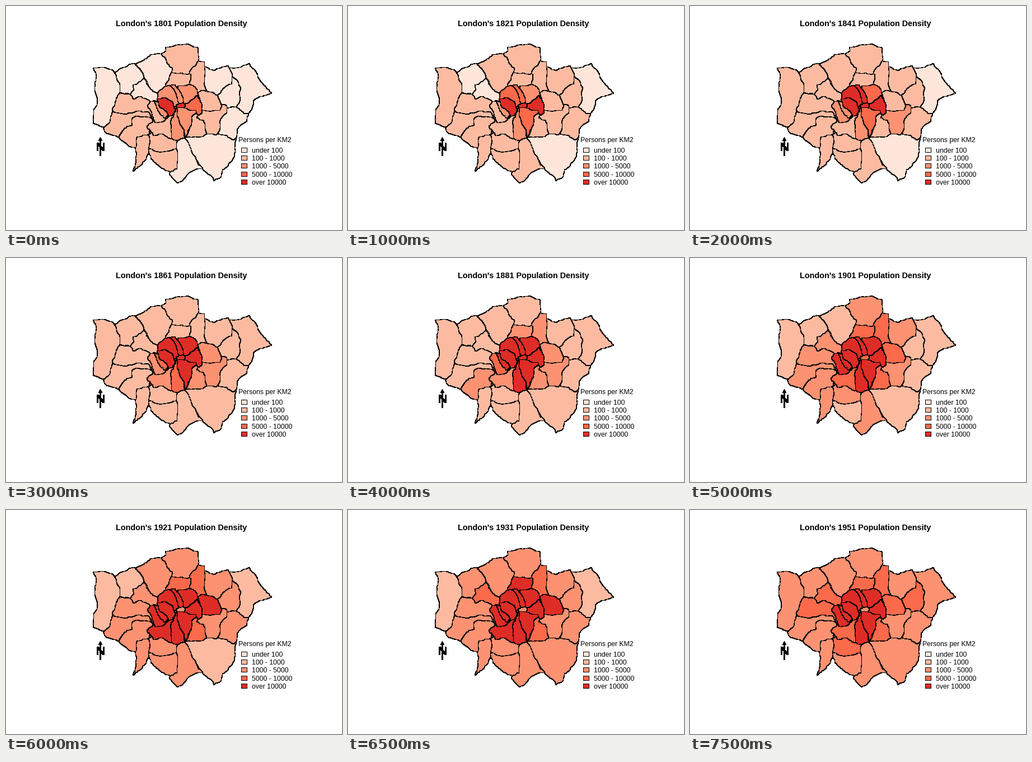
Write a matplotlib script that moves like this. It is 600 px wide and 400 px high and loops after 8 s.

```python
import numpy as np
import matplotlib.pyplot as plt
from matplotlib.animation import FuncAnimation
from matplotlib.patches import Polygon, Rectangle

W, H, DPI = 600, 400, 100
PX = 72 / DPI
REDS = ["#fee5d9", "#fcbba1", "#fc9272", "#fb6a4a", "#de2d26"]
LABELS = ["under 100", "100 - 1000", "1000 - 5000", "5000 - 10000", "over 10000"]
YEARS = [*range(1801, 1932, 10), 1939, 1951]

plt.rcParams["font.family"] = "Liberation Sans"
fig = plt.figure(figsize=(W / DPI, H / DPI), dpi=DPI, facecolor="white")
ax = fig.add_axes([0, 0, 1, 1])
ax.set(xlim=(0, W), ylim=(H, 0))
ax.axis("off")

rng = np.random.default_rng(7)
areas = []


def ragged(a, b):
    """Fractal border from a up to, not including, b."""
    d = b - a
    if np.hypot(*d) < 4:
        return [a]
    mid = (a + b) / 2 + np.array([-d[1], d[0]]) * rng.uniform(-0.11, 0.11)
    return ragged(a, mid) + ragged(mid, b)


def border(corners):
    pts = np.array(corners, float)
    line = [p for a, b in zip(pts, np.roll(pts, -1, axis=0)) for p in ragged(a, b)]
    return np.round(line) + 0.5


def area(level, steps, *corners):
    """Add a district; its class rises at each year in steps, falls at negative ones."""
    patch = Polygon(border(corners), ec="black", lw=PX, joinstyle="bevel",
                    antialiased=False, zorder=1 + len(areas) / 100)
    ax.add_patch(patch)
    areas.append((patch, level, steps))


def level_at(level, steps, year):
    return level + sum(1 if s > 0 else -1 for s in steps if abs(s) <= year)


# Later districts cover the rough inner sides of earlier ones.
# Hillingdon, Harrow, Havering, Enfield
area(0, [1821, 1939], (155, 110), (167, 109), (188, 113), (193, 118), (204, 140),
     (206, 165), (198, 195), (180, 216), (155, 209), (163, 172), (158, 148))
area(0, [1831, 1931], (193, 118), (212, 109), (228, 102), (252, 128), (246, 142),
     (228, 160), (203, 154), (203, 140))
area(0, [1861, 1939], (399, 110), (434, 102), (447, 119), (463, 143), (474, 156),
     (453, 161), (441, 170), (432, 192), (412, 186), (408, 165), (412, 150))
area(1, [1901], (277, 85), (285, 80), (284, 73), (303, 69), (342, 74), (343, 98),
     (334, 126), (291, 126))

# Bromley, Croydon, Bexley
area(0, [1851, 1931], (319, 235), (330, 224), (390, 218), (411, 236), (409, 260),
     (403, 276), (386, 292), (384, 304), (371, 312), (365, 302), (351, 291),
     (310, 245))
area(0, [1811, 1891], (298, 238), (319, 236), (330, 254), (351, 290), (333, 294),
     (320, 306), (306, 316), (291, 300), (298, 275))
area(0, [1821, 1921], (390, 182), (396, 177), (410, 179), (424, 191), (433, 191),
     (429, 206), (412, 220), (411, 234), (405, 239), (380, 229), (374, 215))

# Barnet, Brent, Ealing, Hounslow
area(0, [1811, 1911], (230, 104), (244, 97), (257, 87), (277, 85), (297, 112),
     (297, 130), (284, 154), (270, 157), (246, 127))
area(0, [1841, 1891, 1931], (221, 157), (228, 149), (227, 140), (246, 128),
     (271, 157), (276, 168), (255, 178), (228, 172))
area(1, [1891, 1939], (189, 185), (196, 165), (203, 154), (221, 157), (227, 166),
     (240, 161), (257, 170), (260, 194), (195, 196))
area(1, [1891], (173, 217), (185, 207), (190, 188), (212, 193), (240, 187),
     (254, 189), (260, 200), (214, 230), (201, 234), (177, 225))

# Kingston, Sutton, Richmond, Merton, Wandsworth
area(1, [1891], (230, 253), (228, 238), (242, 226), (262, 226), (264, 256),
     (252, 266), (226, 295), (231, 270))
area(1, [1911], (254, 259), (256, 248), (302, 250), (305, 290), (291, 295),
     (273, 286))
area(1, [1881], (201, 234), (208, 222), (225, 212), (226, 199), (234, 196),
     (262, 202), (255, 229), (234, 233), (232, 252), (222, 251))
area(1, [1891, 1939], (253, 229), (264, 222), (296, 226), (306, 238), (303, 255),
     (288, 259), (254, 254), (257, 242))
area(1, [1851, 1891, 1911, -1951], (251, 214), (264, 204), (300, 192), (302, 232),
     (294, 237), (276, 228), (263, 231))

# Redbridge, Barking, Waltham Forest, Haringey
area(0, [1811, 1901], (350, 108), (356, 108), (371, 115), (396, 106), (404, 122),
     (408, 146), (384, 166), (350, 160))
area(0, [1811, 1911, 1951], (376, 160), (384, 151), (402, 139), (403, 124),
     (419, 146), (416, 172), (410, 180), (384, 184))
area(1, [1881, 1901], (342, 98), (354, 99), (354, 130), (358, 152), (346, 162),
     (322, 146), (324, 126))
area(1, [1871, 1891, 1931, -1951], (294, 119), (330, 121), (327, 139), (322, 150),
     (288, 152), (284, 143))

# Greenwich, Newham, Lewisham
area(1, [1831], (336, 196), (345, 180), (394, 178), (394, 190), (381, 206),
     (382, 218), (374, 230), (352, 230))
area(1, [1861, 1891, 1911, -1951], (336, 160), (352, 150), (366, 153), (377, 159),
     (385, 178), (382, 186), (346, 186))
area(1, [1861, 1891], (330, 186), (342, 192), (340, 199), (352, 204), (358, 228),
     (351, 233), (320, 233))

# Lambeth, Southwark, Hackney, Tower Hamlets
area(2, [1851, 1881], (299, 194), (304, 178), (318, 182), (319, 235), (304, 240),
     (295, 236), (293, 208))
area(2, [1811, 1861], (305, 176), (336, 178), (341, 188), (331, 198), (331, 210),
     (319, 235), (309, 206), (306, 186))
area(2, [1831, 1861], (306, 142), (327, 139), (341, 149), (346, 166), (330, 176),
     (312, 174))
area(3, [1821], (317, 176), (341, 159), (350, 178), (349, 191), (343, 195),
     (339, 186), (326, 185), (317, 181))

# Islington, Hammersmith, Camden, Kensington, Westminster, City
area(2, [1811, 1841], (288, 142), (301, 140), (313, 156), (317, 172), (310, 178))
area(1, [1831, 1881, 1891], (252, 178), (257, 170), (268, 170), (290, 196),
     (280, 206), (266, 208))
area(2, [1811, 1841], (270, 156), (283, 143), (292, 142), (308, 174), (302, 180),
     (271, 168))
area(2, [1851, 1871], (262, 168), (278, 170), (292, 192), (282, 200))
area(4, [], (269, 165), (284, 163), (297, 171), (302, 184), (297, 195),
     (290, 196), (286, 188), (274, 180))
area(4, [-1901, -1921], (303, 178), (308, 174), (316, 172), (320, 176), (318, 181),
     (305, 181))


def text(x, y, s, px, **kw):
    return ax.text(x, y, s, fontsize=px * PX, va="baseline", **kw)


def ink(*corners):
    ax.add_patch(Polygon(corners, fc="black", ec="none", antialiased=False, zorder=3))


# Legend
text(415, 243, "Persons per KM2", 12.3)
for i, (colour, label) in enumerate(zip(REDS, LABELS)):
    y = round(257.6 + 14.4 * i)
    ax.add_patch(Rectangle((419.5, y - 5.5), 10, 8, fc=colour, ec="black",
                           lw=PX, antialiased=False, zorder=3))
    text(439, y + 4, label, 12.3)

# North arrow
ink((168.5, 234), (172, 241), (169.5, 241), (169.5, 268), (167.5, 268),
    (167.5, 241), (165, 241))
ink((162, 244), (165, 244), (173, 254), (173, 244), (176, 244), (176, 259),
    (173, 259), (165, 249), (165, 259), (162, 259))

title = text(313.5, 36, "", 14.4, ha="center", weight="bold")


def draw(i):
    year = YEARS[i]
    title.set_text(f"London's {year} Population Density")
    for patch, level, steps in areas:
        patch.set_facecolor(REDS[level_at(level, steps, year)])
    return [title, *(a[0] for a in areas)]


anim = FuncAnimation(fig, draw, frames=len(YEARS), interval=500,
                     repeat=True, repeat_delay=0, blit=False)
plt.show()
```
